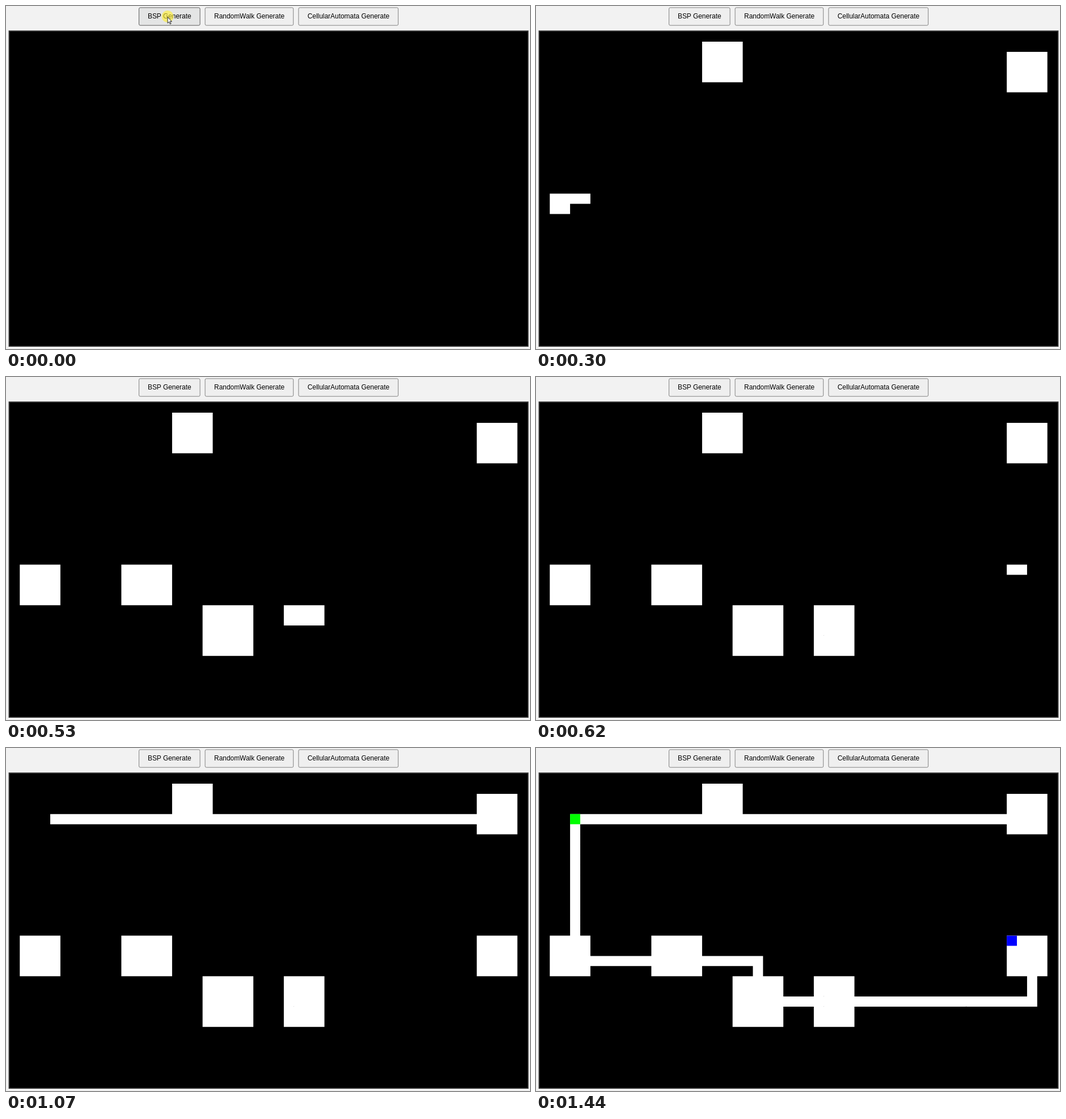
Recreate the animation shown at these times as an HTML page. Size 924 px wide and 606 px high, loop 1.69 s.

```html
<!DOCTYPE html>
<html lang="en">
<head>
<meta charset="utf-8">
<title>Dungeon generator</title>
<style>
  html, body { margin: 0; width: 100%; height: 100%; overflow: hidden; background: #f2f2f2; }
  svg { display: block; width: 924px; height: 606px; }
  text { font: 11.93px "Liberation Sans", Arial, sans-serif; text-anchor: middle; }
  .button { fill: #efefef; stroke: #767676; stroke-width: .9; }
  .button.hover { fill: #e4e5e5; stroke: #4f4f4f; }
</style>
</head>
<body>
<svg viewBox="0 0 924 606">
  <rect id="bsp" class="button" x="234.5" y="2.9" width="107.6" height="31.3" rx="2.2"/>
  <rect class="button" x="351.1" y="2.9" width="155.6" height="31.3" rx="2.2"/>
  <rect class="button" x="515.9" y="2.9" width="175.7" height="31.3" rx="2.2"/>
  <text x="288.3" y="22">BSP Generate</text>
  <text x="429.1" y="22">RandomWalk Generate</text>
  <text x="603.9" y="22">CellularAutomata Generate</text>

  <g transform="translate(6.4 45.1) scale(17.907)">
    <rect x="-.05" y="-.05" width="51.1" height="31.1" stroke="#333" stroke-width=".1"/>
    <path id="floor" fill="#fff"/>
    <g id="markers">
      <rect x="3" y="4" width="1" height="1" fill="#0f0"/>
      <rect x="46" y="16" width="1" height="1" fill="#00f"/>
    </g>
  </g>

  <g id="pointer">
    <circle id="glow" cx="285" cy="18.5" r="10.5" fill="#ffef30" fill-opacity=".62"/>
    <path d="M285 19.5v10.8l2.5-2.3 1.8 4 1.7-.8-1.8-3.8h3.2z" fill="#fff" stroke="#111" stroke-width=".9"/>
  </g>
</svg>
<script>
const LOOP = 1690, CLICK = 100, REFRESH = 75;
const byId = id => document.getElementById(id);
const show = (id, on) => { byId(id).style.display = on ? "" : "none"; };

// Column, row, width, height in grid cells
const rooms = [
  [16, 1, 4, 4], [46, 2, 4, 4], [1, 16, 4, 4], [11, 16, 5, 4],
  [19, 20, 5, 5], [27, 20, 4, 5], [46, 16, 4, 4],
];
// Corners of the tunnel that links the rooms
const tunnel = [[18, 4], [48, 4], [3, 4], [3, 18], [21, 18], [21, 22], [48, 22], [48, 18]];

// Every cell in digging order: rooms row by row, then the tunnel
const cells = rooms.flatMap(([x, y, w, h]) =>
  Array.from({ length: w * h }, (_, i) => [x + i % w, y + Math.floor(i / w)]));
let [x, y] = tunnel[0];
cells.push([x, y]);
for (const [cornerX, cornerY] of tunnel)
  while (x !== cornerX || y !== cornerY) {
    x += Math.sign(cornerX - x);
    y += Math.sign(cornerY - y);
    cells.push([x, y]);
  }

// Digging pace: [time in ms, cells dug], linear in between
const pace = [[55, 0], [155, 22], [380, 71], [530, 101], [755, 143], [1055, 204], [1430, cells.length]];

function dugAt(t) {
  if (t < CLICK) return 0;
  const seen = 5 + REFRESH * Math.floor((t - 5) / REFRESH);
  const next = pace.findIndex(([time]) => time >= seen);
  if (next < 0) return cells.length;
  const [t0, n0] = pace[next - 1], [t1, n1] = pace[next];
  return Math.round(n0 + (n1 - n0) * (seen - t0) / (t1 - t0));
}

function draw(t) {
  const count = dugAt(t);
  const dug = new Set(cells.slice(0, count).map(([x, y]) => `M${x} ${y}h1v1h-1z`));
  byId("floor").setAttribute("d", [...dug].join(""));
  show("markers", count === cells.length);

  const hover = t < 230;
  const lift = t < CLICK ? 0 : t < 155 ? -6 : -22.5;
  byId("pointer").setAttribute("transform", `translate(0 ${lift})`);
  show("pointer", hover);
  show("glow", t < 155);
  byId("bsp").classList.toggle("hover", hover);
}

const begin = performance.now();
function tick() {
  draw((performance.now() - begin) % LOOP);
  requestAnimationFrame(tick);
}
tick();
</script>
</body>
</html>
```
